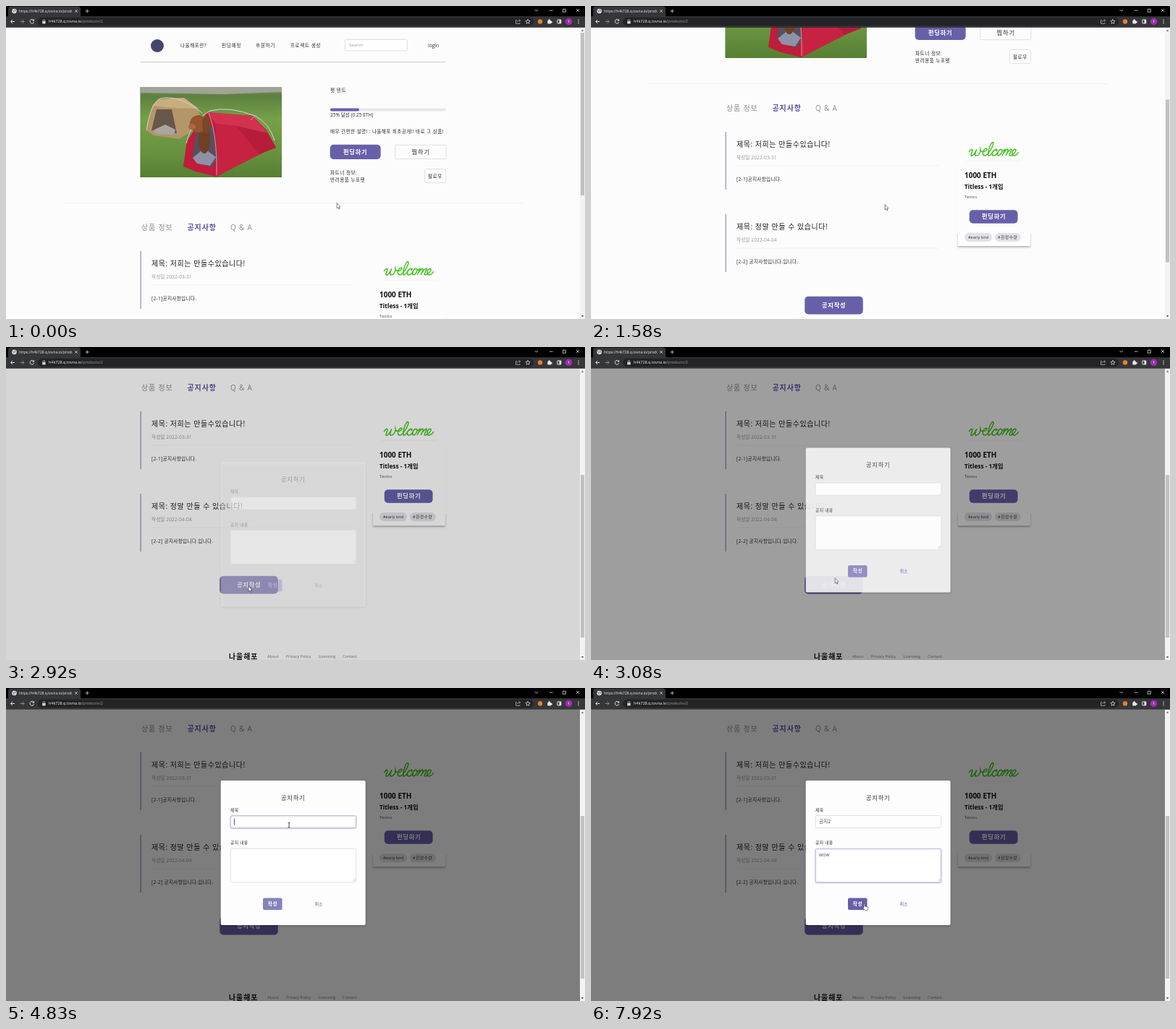
Write an HTML page with a canvas that moves like this. It is 800 px wide and 433 px high and loops after 8000 ms.

```html
<!DOCTYPE html>
<html lang="ko">
<head>
<meta charset="utf-8">
<title>공지 작성</title>
<style>
html, body { margin: 0; width: 100%; height: 100%; overflow: hidden; background: #fdfcfd; }
canvas { display: block; width: 800px; height: 433px; }
</style>
</head>
<body>
<canvas id="stage"></canvas>
<script>
const LOOP = 8000;
const TOP = 29.6;
const FONT = '"Open Sans", "Noto Sans CJK KR", "Noto Sans CJK", sans-serif';
const PURPLE = '#6760a9';
const HOST = 'h4k728.q.tovna.io';
const BRAND = '나울해포';

const canvas = document.getElementById('stage');
const ctx = canvas.getContext('2d');
const dpr = window.devicePixelRatio || 1;
canvas.width = Math.round(800 * dpr);
canvas.height = Math.round(433 * dpr);

const clamp = v => Math.max(0, Math.min(1, v));
const span = (t, a, b) => clamp((t - a) / (b - a));
const smooth = p => p * p * (3 - 2 * p);

// y is the visual middle of the line
function text(str, x, y, size, color = '#2b2b2e', spacing = 0, weight = 400) {
  ctx.font = `${weight} ${size}px ${FONT}`;
  ctx.letterSpacing = spacing + 'px';
  ctx.fillStyle = color;
  ctx.fillText(str, x, y + size * 0.36);
  return ctx.measureText(str).width;
}
const bold = (str, x, y, size, color, spacing) => text(str, x, y, size, color, spacing, 700);

function box(x, y, w, h, r, fill, stroke, line = 0.8) {
  ctx.beginPath();
  ctx.roundRect(x, y, w, h, r);
  if (fill) { ctx.fillStyle = fill; ctx.fill(); }
  if (stroke) { ctx.strokeStyle = stroke; ctx.lineWidth = line; ctx.stroke(); }
}

function poly(points, fill) {
  ctx.beginPath();
  for (let i = 0; i < points.length; i += 2) ctx.lineTo(points[i], points[i + 1]);
  ctx.closePath();
  ctx.fillStyle = fill;
  ctx.fill();
}

function disc(x, y, rx, fill, ry = rx) {
  ctx.beginPath();
  ctx.ellipse(x, y, rx, ry, 0, 0, 7);
  ctx.fillStyle = fill;
  ctx.fill();
}

function stroke(d, color, width = 1) {
  ctx.strokeStyle = color;
  ctx.lineWidth = width;
  ctx.stroke(new Path2D(d));
}

function shadow(color, blur, dy) {
  ctx.shadowColor = color;
  ctx.shadowBlur = blur * dpr;
  ctx.shadowOffsetY = dy * dpr;
}

function browser() {
  box(0, 0, 800, TOP, 0, '#000');
  box(3, 0.5, 100, 18, 4, '#353639');
  box(0, 14.2, 800, TOP - 14.2, 0, '#353639');
  box(44, 15.8, 685, 11.8, 5.9, '#232427');

  disc(11.5, 7, 3.3, '#e6e6e8');
  stroke('M9 6 L11 7 L11 9 M12.5 4.5 L12 6 L14 7.5', '#555', 0.9);
  ctx.save();
  ctx.beginPath();
  ctx.rect(17, 0, 74.5, 14);
  ctx.clip();
  text(`https://${HOST}/products`, 18, 7, 5.05, '#eee');
  ctx.restore();
  stroke('M95.2 5.2 L98.8 8.8 M98.8 5.2 L95.2 8.8 M109.7 7 H114.7 M112.2 4.5 V9.5', '#ddd', 0.8);
  stroke('M730.5 5 L732.7 7.2 L735 5 M751 6.2 H755.5 M769.3 4.3 H773.3 V8.3 H769.3 Z M788 4 L792 8 M792 4 L788 8', '#ddd', 0.8);

  stroke('M12 21.5 H6.5 M9 19 L6.5 21.5 L9 24', '#e4e4e6');
  stroke('M19.5 21.5 H25 M22.5 19 L25 21.5 L22.5 24', '#8a8b8e');
  stroke('M38.2 19.7 A2.8 2.8 0 1 0 38.6 22.3 M38.6 18.4 V20.3 H36.6', '#e4e4e6');
  box(50.2, 21, 4.4, 3.5, 0.5, '#d4d4d6');
  stroke('M51.1 21 V20 A1.3 1.3 0 0 1 53.7 20 V21', '#d4d4d6', 0.8);
  const w = text(HOST, 59, 21.5, 5.45, '#f0f0f2');
  text('/products/2', 59 + w, 21.5, 5.45, '#a0a1a5');

  stroke('M706 19.5 H704.5 V24.5 H710 V23 M706 22.5 C706.5 20.5 708 20 710.5 20 M708.8 18.3 L710.6 20 L708.8 21.7', '#b0b0b3', 0.8);
  stroke('M721 18.3 L721.9 20.5 L724.2 20.6 L722.4 22.1 L723 24.4 L721 23.1 L719 24.4 L719.6 22.1 L717.8 20.6 L720.1 20.5 Z', '#d4d4d6', 0.8);
  disc(738, 21.5, 3.2, '#e2822f');
  box(748.3, 20, 4.8, 4.5, 0.5, '#e8e8ea');
  disc(750.6, 19.4, 1.2, '#e8e8ea');
  disc(753.5, 22.2, 1.2, '#e8e8ea');
  box(761.8, 19, 5, 5, 0.5, null, '#eee', 1);
  box(764.5, 19, 2.3, 5, 0, '#eee');
  disc(777.5, 21.5, 4.7, '#a32db3');
  text('t', 776.5, 21.2, 5.5, '#fff');
  for (const y of [19.2, 21.5, 23.8]) disc(791, y, 0.7, '#e4e4e6');
}

function scrollbar(scroll) {
  box(793, TOP, 7, 433 - TOP, 0, '#f4f3f4');
  box(794, 37 + scroll * 0.56, 5, 225, 0, '#c1c0c2');
  poly([794.8, 35, 796.5, 32.6, 798.2, 35], '#777');
  poly([794.8, 428, 796.5, 430.4, 798.2, 428], '#555');
}

function photo() {
  ctx.save();
  ctx.beginPath();
  ctx.rect(185.4, 112, 195.6, 125);
  ctx.clip();
  const grass = ctx.createLinearGradient(0, 112, 0, 237);
  grass.addColorStop(0, '#7d8f6a');
  grass.addColorStop(0.1, '#5d8040');
  grass.addColorStop(0.35, '#75a048');
  grass.addColorStop(0.7, '#69933f');
  grass.addColorStop(1, '#567f33');
  ctx.fillStyle = grass;
  ctx.fillRect(185, 112, 196, 125);
  poly([185, 112, 381, 112, 381, 119, 300, 122, 185, 120], '#a0a396');

  // tan tent
  poly([194, 172, 202, 138, 212, 129, 246, 127, 266, 142, 270, 164, 240, 184, 204, 179], '#b3966a');
  poly([201, 172, 208, 143, 229, 143, 236, 176], '#67564a');
  poly([203, 172, 220, 164, 234, 171, 232, 178, 208, 177], '#a9a5a2');
  poly([202, 138, 212, 129, 246, 127, 266, 142, 230, 141], '#c8ad80');
  stroke('M194 172 Q200 134 213 128 Q240 122 271 148', '#d9d3c6', 1);

  // red tent
  poly([245, 222, 250, 186, 278, 147, 341, 152, 360, 172, 373, 196, 357, 202, 290, 236, 262, 229], '#c01c3c');
  poly([278, 147, 341, 152, 362, 176, 318, 166, 290, 163], '#d23250');
  poly([290, 163, 318, 166, 350, 205, 291, 236], '#c82243');
  poly([318, 166, 362, 176, 373, 196, 350, 205], '#b51d3b');
  poly([257, 208, 263, 174, 286, 165, 292, 210, 284, 224], '#594f5c');
  poly([258, 210, 274, 197, 290, 209, 282, 221, 264, 218], '#8e91a8');
  stroke('M249 190 Q256 158 282 145 Q308 138 344 152 Q364 162 371 186', '#ddd2d2', 1);
  stroke('M280 148 Q292 178 291 234 M344 152 L338 158', '#d8b9be', 0.8);

  // dog
  disc(274, 184, 8, '#6f4024', 20);
  disc(266, 163, 12, '#95552e', 12);
  disc(277, 164, 6, '#7d4527', 12);
  disc(257, 167, 5, '#aa683b', 4);
  ctx.restore();
}

function welcome() {
  ctx.save();
  ctx.translate(521, 372);
  ctx.transform(1, 0, -0.12, 1.08, 0, 0);
  ctx.lineCap = 'round';
  stroke('M1 -5 C3 -9 6 -9 5 -5 C3 0 4 1 6 0 C9 -2 10 -6 11 -8 C9 -3 9 0 11 0 C15 0 17 -5 16 -8 C16 -5 18 -5 20 -5' +
    ' C24 -5 27 -9 24 -9 C20 -9 18 0 23 0 C28 0 36 -17 32 -17 C29 -17 25 0 29 0' +
    ' C32 0 34 -8 38 -8 C40 -8 39 -6 38 -6 M36 -7.5 C32 -5 32 0 36 0' +
    ' C38 0 40 -3 41 -5 C43 -10 48 -8 46 -4 C44 1 39 1 41 -4 M46 -6 C48 -6 49 -7 50 -8' +
    ' C50 -6 48 -2 47 0 C49 -5 53 -9 54 -8 C55 -6 53 -2 52 0 C54 -5 58 -9 59 -8 C60 -6 55 0 58 0' +
    ' C62 0 68 -8 64 -8 C60 -8 59 0 63 0 C66 0 68 -2 69 -4', '#45c31f', 1.5);
  ctx.restore();
}

function notice(y, title, date, body) {
  box(185.3, y, 1.8, 80, 0, '#b3afcb');
  text(title, 201, y + 17, 10, '#1d1d20', 0.55);
  text(date, 201, y + 35.3, 6.6, '#97979b', 0.1);
  stroke(`M201 ${y + 47} H480`, '#ececef', 0.8);
  text(body, 201, y + 65.5, 6.67, '#2b2b2e', 0.27);
}

function card() {
  ctx.save();
  shadow('rgba(0,0,0,.28)', 3, 2);
  box(507, 381, 100, 116, 1, '#fefdfe');
  ctx.restore();
  box(505, 340, 104, 140, 0, '#fdfcfd');
  welcome();
  stroke('M518 379 H596', '#f0eff1', 0.8);
  bold('1000 ETH', 516, 399.7, 10, '#111');
  bold('Titless - 1개입', 516, 415, 8.3, '#111');
  text('Textss', 516, 429, 6.1, '#55555a');
  box(522.8, 447.3, 66.8, 18.4, 5, PURPLE);
  bold('펀딩하기', 540, 456.4, 8.33, '#fff', 0.7);
  box(516, 479, 38, 12, 6, '#e2e1e8');
  box(558, 479, 36, 12, 6, '#e2e1e8');
  text('#early bird', 521, 484.8, 5.6, '#333');
  text('#한정수량', 562, 484.8, 5.6, '#333', 0.6);
}

function page() {
  disc(209, 55, 9, '#45466f');
  text(BRAND + '란?', 241, 54.3, 6.67, '#2b2b2e', 0.45);
  text('펀딩예정', 298, 54.3, 6.67, '#2b2b2e', 0.6);
  text('후원하기', 345, 54.3, 6.67, '#2b2b2e', 0.6);
  text('프로젝트 생성', 393, 54.3, 6.67, '#2b2b2e', 0.5);
  box(468.4, 46.4, 85.8, 15.4, 1, '#fff', '#d6d5da');
  text('Search', 474, 54.2, 6.1, '#97979b');
  text('login', 583, 54.2, 6.67);
  stroke('M186 77.5 H607', '#c6c4cc', 1.2);

  photo();
  text('펫 텐트', 448, 117, 6.67, '#2b2b2e', 0.5);
  box(448, 141.6, 160, 3.8, 1.9, '#e7e6ea');
  box(448, 141.6, 40, 3.8, 1.9, PURPLE);
  text('25% 달성 (0.25 ETH)', 448, 150.6, 6.6);
  text(`매우 간편한 설명! : ${BRAND} 최초공개!! 바로 그 상품!`, 448, 173.6, 6.67, '#2b2b2e', 0.35);
  box(447.7, 191.8, 70, 20.2, 5, PURPLE);
  bold('펀딩하기', 466, 202, 8.33, '#fff', 0.7);
  box(537.8, 192.4, 70, 19.2, 0.5, '#fdfcfd', '#d9d8de');
  text('찜하기', 560.5, 202, 8.33, '#2b2b2e', 0.8, 500);
  text('파트너 정보:', 448, 230.3, 6.67, '#2b2b2e', 0.45);
  text('반려용품 누포펫', 448, 240.3, 6.67, '#2b2b2e', 0.45);
  box(578.4, 225.4, 29.2, 19.2, 3, '#fdfcfd', '#d9d8de');
  text('팔로우', 583, 235.2, 6.67, '#2b2b2e', 0.5);
  stroke('M80 272.3 H714', '#ebeaed', 0.8);

  text('상품 정보', 187, 306, 10, '#8d8d91', 0.8);
  bold('공지사항', 250.5, 306, 10, '#5b54a2', 0.9);
  text('Q & A', 310, 306, 10, '#8d8d91', 0.8);
  notice(339, '제목: 저희는 만들수있습니다!', '작성일 2022-03-31', '[2-1]공지사항입니다.');
  notice(453, '제목: 정말 만들 수 있습니다!', '작성일 2022-04-04', '[2-2] 공지사항입니다.입니다.');
  card();
  box(295.3, 566.8, 80.5, 24.6, 5, PURPLE);
  bold('공지작성', 319, 579, 8.33, '#fff', 0.7);

  bold(BRAND, 308, 678, 10, '#111', 0.9);
  text('About', 361, 678.2, 5.6, '#77777b');
  text('Privacy Policy', 387, 678.2, 5.5, '#77777b');
  text('Licensing', 431.5, 678.2, 5.5, '#77777b');
  text('Contact', 465, 678.2, 5.5, '#77777b');
}

// Latest value of a list of [time, value]
function at(list, t) {
  let value = list[0][1];
  for (const [time, v] of list) if (t >= time) value = v;
  return value;
}
const TITLE = [[0, ''], [5250, 'ㄱ'], [5330, '고'], [5420, '공'], [5580, '공ㅈ'], [5670, '공지'], [5920, '공지2']];
const BODY = [[0, ''], [6920, 'wo'], [7000, 'wow']];

function field(y, h, value, focus, caret) {
  ctx.save();
  if (focus) shadow(`rgba(103,96,169,${0.4 * focus})`, 1.5, 0.7);
  box(310.2, y, 173.6, h, 2, '#fff', focus > 0.5 ? '#b9b7d8' : '#d9d8de');
  ctx.restore();
  const w = value ? text(value, 315, y + 8.5, 6.5, '#4a4a4e', 0.3) : 0;
  if (caret) box(315.2 + w, y + 4, 0.8, 9, 0, '#333');
}

function modal(t) {
  const open = 1 - Math.pow(1 - span(t, 2830, 3250), 1.5);
  if (!open) return;
  ctx.fillStyle = `rgba(0,0,0,${0.5 * open})`;
  ctx.fillRect(0, TOP, 793, 433 - TOP);

  ctx.save();
  ctx.globalAlpha = Math.min(1, open * 1.17);
  ctx.translate(0, 45 * (1 - open));
  ctx.save();
  shadow('rgba(0,0,0,.25)', 3, 1);
  box(296.7, 128, 200, 200, 2, '#fefdfe');
  ctx.restore();
  text('공지하기', 380, 152, 8.33, '#333', 0.7);
  text('제목', 310, 168.5, 5.83, '#2b2b2e', 0.4);
  text('공지 내용', 310, 214.3, 5.83, '#2b2b2e', 0.3);

  const inBody = t >= 6080;
  const titleFocus = inBody ? 0 : span(t, 4500, 4830);
  field(176.5, 17, at(TITLE, t), titleFocus, t >= 4500 && !inBody);
  const bodyCaret = (inBody && t < 6580) || (t >= 6920 && t < 7500);
  field(222.2, 46.6, at(BODY, t), inBody ? span(t, 6030, 6170) : 0, bodyCaret);
  stroke('M479.5 267 L482.5 264 M481.5 267 L482.5 266', '#888', 0.6);

  box(355, 290.5, 26.6, 16.5, 2, t >= 7830 ? PURPLE : '#8781bd');
  bold('작성', 361.8, 298.6, 6.67, '#fff', 0.5);
  text('취소', 426.8, 298.6, 5.83, '#5b54a2', 0.2);
  ctx.restore();
}

const PATH = [[0, 457, 273], [80, 457, 273], [580, 406, 275], [1670, 406, 275], [2170, 360, 302], [2500, 334, 336],
  [2830, 334, 336], [3080, 337, 320], [3750, 395, 191], [4500, 395, 191], [4580, 391, 189],
  [7450, 391, 189], [7700, 398, 255], [7900, 376, 298], [LOOP, 376, 298]];

function cursor(t) {
  let i = 1;
  while (i < PATH.length - 1 && t > PATH[i][0]) i++;
  const [t0, x0, y0] = PATH[i - 1], [t1, x1, y1] = PATH[i];
  const p = smooth(span(t, t0, t1));
  const x = x0 + (x1 - x0) * p, y = y0 + (y1 - y0) * p;
  const onButton = (t >= 2380 && t < 2880) || t >= 7830;
  const onField = t >= 4500 && t < 7530;

  ctx.save();
  ctx.translate(x, y);
  if (onField) {
    stroke('M-1.5 -3 Q0 -3 0 -2 Q0 -3 1.5 -3 M0 -2 V3 M-1.5 4 Q0 4 0 3 Q0 4 1.5 4', '#222', 0.8);
  } else {
    const d = onButton
      ? 'M1 0.8 Q1.8 0 2.5 0.8 V4 L6 4.7 Q7 5 6.8 6 L6 9.5 H2.5 L-0.3 6.4 Q-0.5 5.4 1 6 Z'
      : 'M0.2 -0.4 V6.8 L1.8 5.5 L2.9 8 L4 7.5 L3 5.1 L5 4.9 Z';
    ctx.fillStyle = '#fff';
    ctx.fill(new Path2D(d));
    stroke(d, '#333', 0.6);
  }
  ctx.restore();
}

// Six wheel clicks, each eased, snapped to whole pixels
const CLICKS = [920, 1170, 1310, 1450, 1590, 1760];
const scrollAt = t => Math.round(CLICKS.reduce((sum, c) => sum + smooth(span(t, c, c + 150)) * 41.67, 0));

function draw(t) {
  const scroll = scrollAt(t);
  ctx.setTransform(dpr, 0, 0, dpr, 0, 0);
  ctx.fillStyle = '#fdfcfd';
  ctx.fillRect(0, 0, 800, 433);
  ctx.save();
  ctx.beginPath();
  ctx.rect(0, 29, 800, 404);
  ctx.clip();
  ctx.translate(0, -scroll);
  page();
  ctx.restore();
  modal(t);
  scrollbar(scroll);
  browser();
  cursor(t);
}

const start = performance.now();
function frame() {
  draw((performance.now() - start) % LOOP);
  requestAnimationFrame(frame);
}
frame();
</script>
</body>
</html>
```
